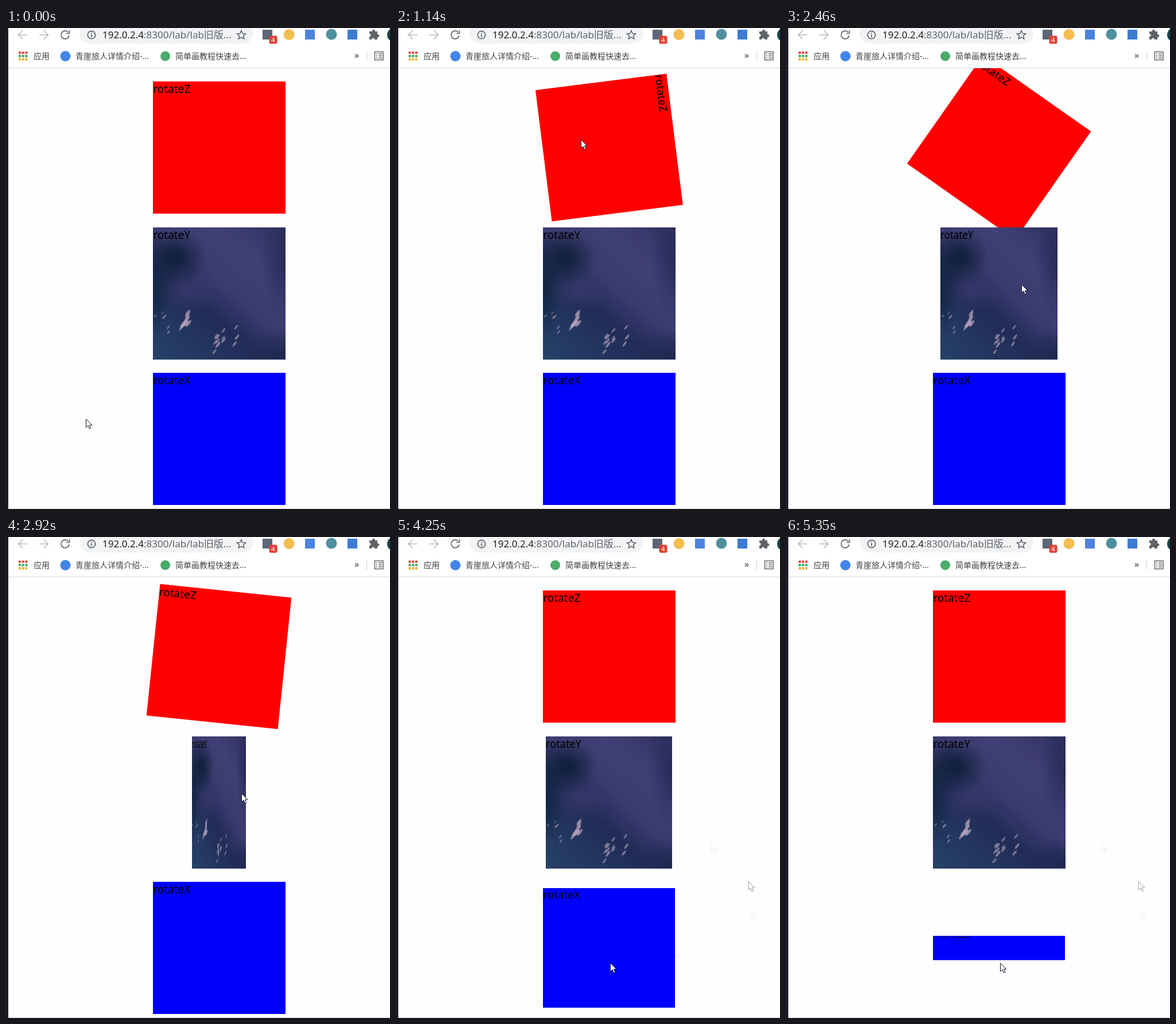
Write an HTML page that moves like this. It is 669 by 837 pixels and loops after 5.42 s.

```html
<!DOCTYPE html>
<html lang="zh-CN">
<head>
<meta charset="utf-8">
<title>rotate</title>
<style>
html, body { margin: 0; width: 100%; height: 100%; overflow: hidden; background: #fefefe; }
body { font-family: "Noto Sans", "Noto Sans CJK SC", "Noto Sans CJK", sans-serif; }
#bar { position: absolute; left: 0; top: 0; z-index: 1; }
#page { position: absolute; left: 0; top: 70px; width: 669px; height: 767px; z-index: 0; overflow: hidden; }
.box { display: grid; width: 230.4px; height: 230.4px; margin: 23.1px 0 0 256.4px; font-size: 19px; line-height: 26px; color: #000; }
.box > * { grid-area: 1 / 1; }
#z { background: #f00; }
#x { background: #00f; }
#y {
  background:
    radial-gradient(ellipse 58px 48px at 38px 52px, #10203cf0 15%, #10203c00),
    radial-gradient(ellipse 34px 80px at 0 110px, #10243fe0, #10243f00),
    radial-gradient(ellipse 55px 40px at 62px 108px, #363769, #36376900),
    radial-gradient(ellipse 60px 45px at 225px 222px, #1e2850, #1e285000),
    radial-gradient(ellipse 45px 100px at 232px 60px, #272b59, #272b5900),
    linear-gradient(40deg, #27426a, #23365f 22%, #212c57 38%, #3c3b70 56%, #414076 75%, #30305f);
}
.cursor { position: absolute; left: 0; top: 0; overflow: visible; }
.ghost { z-index: -1; }
#mouse { z-index: 2; }
</style>
</head>
<body>
<svg id="bar" width="669" height="837" pointer-events="none">
  <rect width="669" height="69" fill="#fff"/>
  <path d="M0 69.5H669M4 836.5H669" stroke="#d5d6d8"/>
  <rect x="128" y="-8" width="303" height="35" rx="17.5" fill="#f1f3f4"/>
  <g fill="none" stroke="#b9bbbe" stroke-width="1.7">
    <path d="M37 12H22M29 4.5L21.5 12L29 19.5M58 12H73M66 4.5L73.5 12L66 19.5"/>
    <g stroke="#5f6368">
      <path d="M108.5 7.5A7 7 0 1 0 110 13M110.5 4V9.5H105"/>
      <circle cx="149" cy="12" r="6.7"/><path d="M149 11V16M149 8V9.7"/>
      <path d="M410 4.5L412.2 9.6L417.6 10L413.5 13.6L414.8 19L410 16.2L405.2 19L406.5 13.6L402.4 10L407.8 9.6Z" stroke-width="1.5"/>
      <path d="M642.5 41.5H657V55.5H642.5ZM645 45H647M649 45H655M645 48.5H647M649 48.5H655M645 52H647M649 52H655" stroke-width="1.5"/>
    </g>
  </g>
  <rect x="447" y="3" width="17" height="17" fill="#5b6676"/>
  <rect x="458.5" y="13.5" width="14" height="14" rx="3" fill="#e04236"/>
  <text x="462" y="24.5" font-size="11.5" fill="#fff">4</text>
  <circle cx="493" cy="11.5" r="9.5" fill="#f3bd50"/>
  <rect x="521" y="3" width="17" height="17" fill="#4d83de"/>
  <circle cx="567" cy="11" r="9.5" fill="#4e8f9e"/>
  <rect x="595" y="3" width="17" height="17" fill="#3c7bd0"/>
  <path d="M633 6H638A2.6 2.6 0 1 1 643 6H647V11A2.6 2.6 0 1 1 647 16V20H642A2.5 2.5 0 1 0 637 20H633V15A2.5 2.5 0 1 0 633 10Z" fill="#5f6368"/>
  <circle cx="676" cy="12" r="12" fill="#17464d"/>
  <g fill="none" stroke-width="4" stroke-dasharray="4 1.7">
    <path d="M22 43H38" stroke="#e2483d"/>
    <path d="M22 48.7H38" stroke="#3fa45b"/>
    <path d="M22 54.4H38" stroke="#f0b429"/>
  </g>
  <circle cx="103.5" cy="49" r="9" fill="#4285e8"/>
  <circle cx="277.5" cy="49" r="8.5" fill="#4bab68"/>
  <path d="M628.5 40V57" stroke="#d0d2d5"/>
  <text x="168" y="18" font-size="17" fill="#202124">192.0.2.4<tspan fill="#5f6368">:8300/lab/lab旧版...</tspan></text>
  <g font-size="14" fill="#3c4043">
    <text x="48" y="54">应用</text>
    <text x="121" y="54">青崖旅人详情介绍-...</text>
    <text x="295" y="54">简单画教程快速去...</text>
    <text x="607" y="53" font-size="16">»</text>
  </g>
  <rect width="4" height="837" fill="#1e1c28"/>
</svg>
<div id="page">
  <div class="box" id="z"><span>rotateZ</span></div>
  <div class="box" id="y"><svg id="flecks" width="230" height="230"></svg><span>rotateY</span></div>
  <div class="box" id="x"><span>rotateX</span></div>
</div>
<script>
const LOOP = 5420, STEP = 77.4;
const $ = id => document.getElementById(id);

// Cubic Bezier through four values
const cubic = (s, a, b, c, d) =>
  a * (1 - s) ** 3 + 3 * b * s * (1 - s) ** 2 + 3 * c * s * s * (1 - s) + d * s ** 3;

// The screen refreshes at a steady rate after an initial rest
const snap = t => t < 380 ? 0 : 369 + STEP * Math.floor((t - 362) / STEP);

// CSS "ease": cubic-bezier(.25, .1, .25, 1)
function ease(p) {
  if (p <= 0) return 0;
  if (p >= 1) return 1;
  let lo = 0, hi = 1;
  for (let i = 0; i < 25; i++) {
    const mid = (lo + hi) / 2;
    if (cubic(mid, 0, .25, .25, 1) < p) lo = mid; else hi = mid;
  }
  return cubic(lo, 0, .1, 1, 1);
}

// Two-second hover transition, reversed at `turn`; the way back is shortened
function swing(t, start, target, turn, back) {
  const out = target * ease((Math.min(t, turn) - start) / 2000);
  return out * (1 - ease((t - turn) / back));
}

// Pointer moves between rests, each along one curve
const moves = [
  { from: 305, to: 679, x: [139, 40, 230, 322], y: [680, 640, 240, 194] },
  { from: 1607, to: 2072, x: [322, 1050, 700, 410], y: [194, 120, 480, 446] },
  { from: 3465, to: 3929, x: [410, 768, 617, 373], y: [446, 642, 694, 741] }
];
const along = (move, s) => [cubic(s, ...move.x), cubic(s, ...move.y)];

function pointerAt(t) {
  const move = moves.findLast(m => t >= m.from) || moves[0];
  const s = (t - move.from) / (move.to - move.from);
  return along(move, Math.min(1, Math.max(0, s)));
}

function addPointer(parent, className) {
  parent.insertAdjacentHTML('beforeend', `<svg class="cursor ${className}" width="13" height="20">
    <path d="M.5 .5V15L4 11.8L6.3 17.5L8.8 16.5L6.4 11H11Z" fill="#fff" stroke="#15152a"/></svg>`);
  return parent.lastElementChild;
}

function place(el, x, y) { el.style.transform = `translate(${x}px, ${y}px)`; }

function turnBox(axis, angle) {
  $(axis).style.transform = angle > 0 ? `rotate${axis.toUpperCase()}(${angle}deg)` : 'none';
}

let seed = 7;
const random = () => (seed = seed * 16807 % 2147483647) / 2147483647;

// Slanted light flecks scattered around a centre
function scatter(count, cx, cy, w, h, size) {
  for (let i = 0; i < count; i++) {
    const x = cx + (random() - .5) * w, y = cy + (random() - .5) * h, r = size * (.7 + random() * .5);
    $('flecks').insertAdjacentHTML('beforeend', `<ellipse rx="${r}" ry="${r * .34}" fill="#b9a5bd"
      opacity="${.2 + r * .07}" transform="translate(${x} ${y}) rotate(-52)"/>`);
  }
}
scatter(9, 56, 161, 14, 32, 7);
scatter(6, 24, 164, 44, 44, 3.5);
scatter(12, 122, 196, 56, 50, 5.5);

// Faint trail left behind by the last move, in sixths of its way
const lastMove = moves[2];
const ghosts = [1, 2, 3, 5].map(sixth => {
  const el = addPointer($('page'), 'ghost');
  const [x, y] = along(lastMove, sixth / 6);
  place(el, x, y - 70);
  return { el, start: lastMove.from + (sixth + .5) * STEP, alpha: sixth === 2 ? .45 : .08 };
});
const mouse = addPointer(document.body, '');
mouse.id = 'mouse';

function draw(now) {
  const t = snap(now % LOOP);
  turnBox('z', swing(t, 595, 180, 1690, 1640));
  turnBox('y', swing(t, 2050, 90, 3380, 1740));
  turnBox('x', swing(t, 3852, 90, 5200, 1850));
  place(mouse, ...pointerAt(t));
  for (const { el, start, alpha } of ghosts) el.style.opacity = t > start ? alpha : 0;
}

const began = performance.now();
function tick() {
  draw(performance.now() - began);
  requestAnimationFrame(tick);
}
tick();
</script>
</body>
</html>
```
